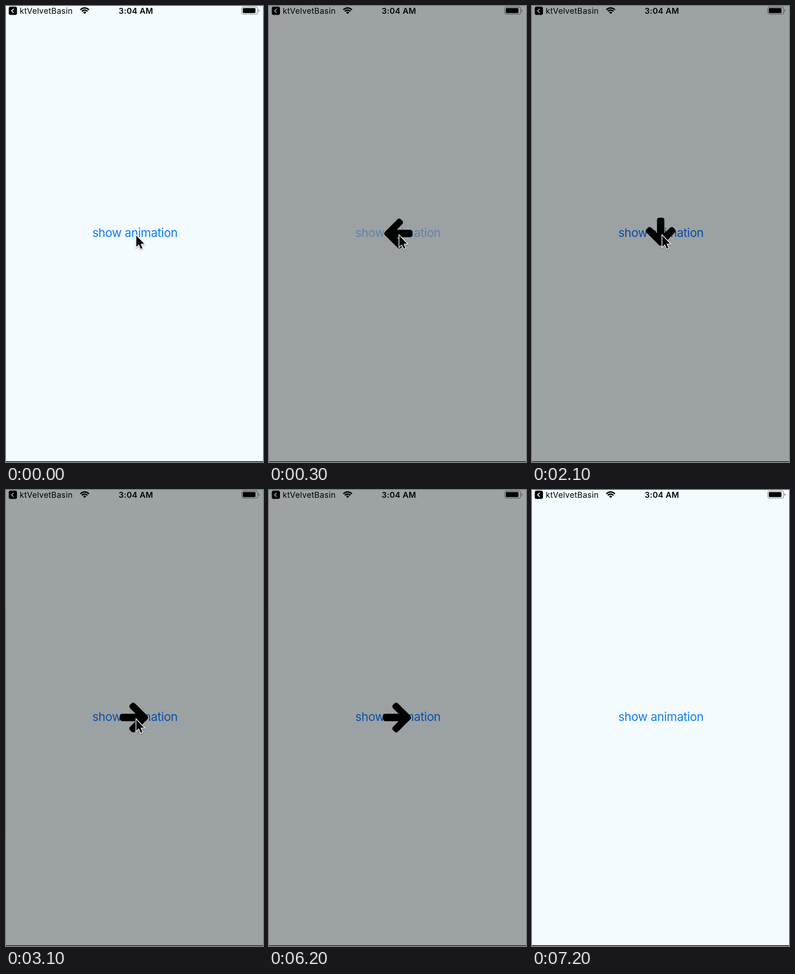
An HTML page that plays this animation: 562x997 px, repeating every 7.3 s.

```html
<!DOCTYPE html>
<html lang="en">
<head>
<meta charset="utf-8">
<title>Arrow loader</title>
<style>
  @property --turn {
    syntax: "<angle>";
    inherits: false;
    initial-value: 0deg;
  }

  html, body {
    margin: 0;
    width: 100%;
    height: 100%;
    overflow: hidden;
    background: #f3fbff;
  }

  svg {
    display: block;
    width: 100vw;
    height: 100vh;
  }

  text {
    font-family: Inter, "Liberation Sans", sans-serif;
  }

  .app-name {
    font-size: 17.5px;
    letter-spacing: .35px;
  }

  .clock {
    font-size: 17.5px;
    font-weight: 600;
    letter-spacing: .3px;
    text-anchor: middle;
  }

  .button {
    font-size: 26px;
    letter-spacing: -.4px;
    text-anchor: middle;
    fill: #0f7bfa;
  }

  .button, .modal, .arrow, .pointer {
    animation: 7300ms linear infinite;
  }

  .button { animation-name: press; }
  .modal { animation-name: modal; }
  .pointer {
    animation-name: pointer;
    filter: drop-shadow(0 1px 1.5px rgba(0, 0, 0, .4));
  }

  /* The vertical arrows sit 2.5px higher than the horizontal ones. */
  .arrow {
    animation-name: turn;
    rotate: var(--turn);
    translate: 0 calc(-1.25px * (1 - cos(2 * var(--turn))));
  }

  @keyframes press {
    0%, .41% {
      opacity: 1;
      animation-timing-function: cubic-bezier(.455, .03, .515, .955);
    }
    2.47%, 3.01% {
      opacity: .2;
      animation-timing-function: cubic-bezier(.455, .03, .515, .955);
    }
    6.44%, 100% { opacity: 1; }
  }

  @keyframes modal {
    0% { opacity: 0; animation-timing-function: step-end; }
    2.822% { opacity: 1; animation-timing-function: step-end; }
    85.616%, 100% { opacity: 0; }
  }

  /* Left, up, right, down: one quarter turn every 268.5 ms. */
  @keyframes turn {
    0% { --turn: 0deg; }
    2.822% { --turn: 0deg; animation-timing-function: steps(23); }
    87.418%, 100% { --turn: 2070deg; }
  }

  @keyframes pointer {
    0% { opacity: 1; animation-timing-function: step-end; }
    80.1%, 100% { opacity: 0; }
  }
</style>
</head>
<body>
<svg viewBox="0 0 562 997" preserveAspectRatio="none">
  <rect width="562" height="997" fill="#f3fbff"/>

  <!-- Status bar -->
  <rect x="6" y="1.5" width="18" height="18" rx="4"/>
  <path d="M16.8 6.2L12.2 10.5L16.8 14.8" fill="none" stroke="#f3fbff" stroke-width="1.9"/>
  <text class="app-name" x="30" y="16.5">ktVelvetBasin</text>
  <g fill="none" stroke="#000" stroke-width="2.8">
    <path d="M162.6 8.5A12.5 12.5 0 0 1 181.4 8.5"/>
    <path d="M166 11.7A8 8 0 0 1 178 11.7"/>
  </g>
  <path d="M172 17.6L168.4 13.9A5 5 0 0 1 175.6 13.9Z"/>
  <text class="clock" x="284" y="16.5">3:04 AM</text>
  <rect x="515.6" y="2.1" width="34.8" height="15.8" rx="3.8" fill="none" stroke="#85898c" stroke-width="1.3"/>
  <rect x="517.9" y="4.4" width="27.6" height="11.2" rx="1.8"/>
  <path d="M552.2 7.4Q554.4 8 554.4 10T552.2 12.6Z" fill="#85898c"/>

  <text class="button" x="282" y="505">show animation</text>

  <g class="modal">
    <rect width="562" height="997" fill="#000" fill-opacity=".357"/>
    <g transform="translate(281.4 497.4)">
      <g class="arrow">
        <path transform="translate(-29.3 0) scale(.0418) translate(0 -672)"
          d="M1472 736v-128q0-53-32.5-90.5t-84.5-37.5h-704l293-294q38-36 38-90t-38-90l-75-76q-37-37-90-37-52 0-91 37l-651 652q-37 37-37 90 0 52 37 91l651 650q38 38 91 38 52 0 90-38l75-74q38-38 38-91t-38-91l-293-293h704q52 0 84.5-37.5t32.5-90.5z"/>
      </g>
    </g>
  </g>

  <path class="pointer" d="M285 502V526.5L290.6 521.2L294.8 531L298.4 529.4L294.3 519.8H302Z"
    stroke="#fff" stroke-width="3" paint-order="stroke"/>

  <rect y="995" width="562" height="1" fill="#6b6f72"/>
  <rect y="996" width="562" height="1" fill="#0d0a14"/>
</svg>
</body>
</html>
```
